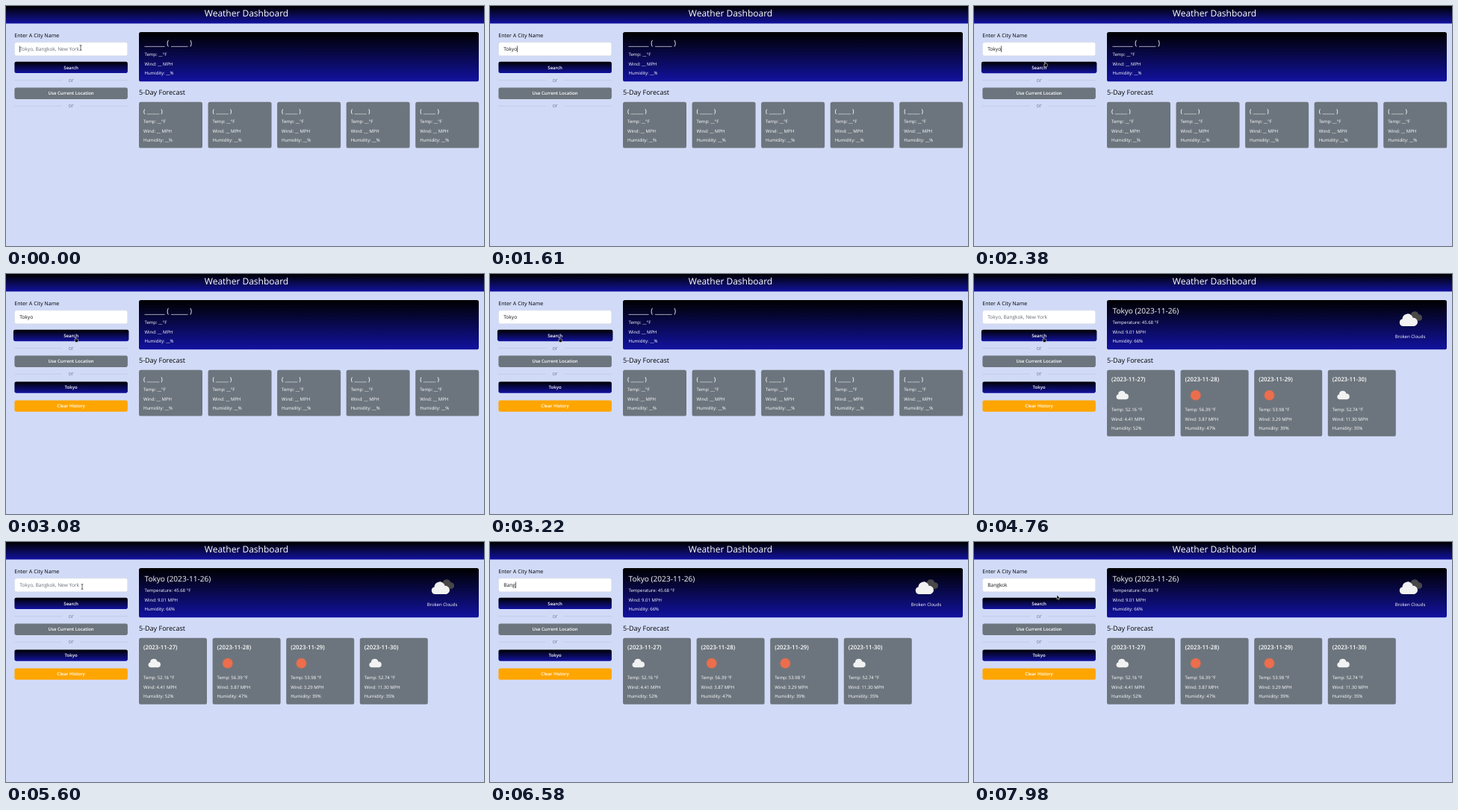
Write an HTML page that moves like this. It is 640 by 322 pixels and loops after 8 s.

```html
<!DOCTYPE html>
<html lang="en">
<head>
<meta charset="utf-8">
<title>Weather Dashboard</title>
<style>
  html, body { margin: 0; height: 100%; overflow: hidden; background: #d1dbf7; }
  svg { display: block; width: 100vw; height: 100vh; }
  text { font: 6px "Open Sans", "Noto Sans", sans-serif; fill: #fff; text-rendering: geometricPrecision; white-space: pre; }
  .mid { text-anchor: middle; }
  .title { font-size: 12px; font-weight: 500; }
  .city { font-size: 10.1px; font-weight: 500; }
  .day { font-size: 7.8px; font-weight: 600; }
  .btn { font-weight: 600; }
  .label { font-size: 7.1px; font-weight: 500; fill: #000; }
  .sub { font-size: 9px; font-weight: 500; fill: #000; }
  .or { font-size: 7.3px; fill: #77819a; }
  .field { font-size: 6.6px; fill: #111; }
  #hint { fill: #666c75; }
</style>
</head>
<body>
<svg viewBox="0 0 640 322">
  <defs>
    <linearGradient id="night" x2="0" y2="1">
      <stop stop-color="#000"/><stop offset="1" stop-color="#1212a0"/>
    </linearGradient>
    <path id="cloud" d="M5.5 17A5 5 0 0 1 5 7.2 7.1 7.1 0 0 1 19 5.8 5.7 5.7 0 0 1 21 17Z"/>
  </defs>
  <rect width="640" height="23.5" fill="url(#night)"/>
  <text class="title mid" x="322" y="14.2">Weather Dashboard</text>

  <text class="label" x="11.3" y="42.4">Enter A City Name</text>
  <rect x="11.6" y="48.8" width="151" height="18" rx="2.4" fill="#fff" stroke="#ced4da" stroke-width=".4"/>
  <text class="field" id="hint" x="18.2" y="60.2">Tokyo, Bangkok, New York</text>
  <text class="field" id="typed" x="18.2" y="60.2"></text>
  <rect id="caret" y="53.5" width=".6" height="8.5" fill="#000"/>
  <g id="side"></g>
  <g id="history"></g>

  <rect x="178" y="35" width="455" height="66.3" rx="2.6" fill="url(#night)"/>
  <text class="sub" x="178" y="118.8">5-Day Forecast</text>
  <g id="blank"></g>
  <g id="live"></g>

  <g id="pointer" stroke="#fff" stroke-width=".5" stroke-linejoin="round">
    <path id="beam" d="M-1.4 -3.5Q0 -3.5 0 -2.6Q0 -3.5 1.4 -3.5M0 -2.8V2.8M-1.4 3.5Q0 3.5 0 2.6Q0 3.5 1.4 3.5" fill="none" stroke="#222" stroke-width=".7"/>
    <path id="arrow" d="M0 -1V4.8L1.3 3.6 2.2 5.6 3.2 5.1 2.3 3.2H4Z"/>
    <path id="hand" d="M-1.3 -3.4Q-.6 -4 -.2 -3.2V-1L2.2 -.5Q2.9 -.2 2.7 1L2 3.4H-.9L-2.5 .8Q-2.3 -.1 -1.3 .6Z"/>
  </g>
</svg>
<script>
const $ = id => document.getElementById(id);
const text = (cls, x, y, s) => `<text class="${cls}" x="${x}" y="${y}">${s}</text>`;
const lines = (x, y, list) => list.map((s, i) => text('', x, y + i * 12.6, s)).join('');
const button = (y, fill, label, id = '') => `<g id="${id}">
  <rect x="11.4" y="${y}" width="151.5" height="15.3" rx="2.4" fill="${fill}"/>
  ${text('btn mid', 87.1, y + 9.8, label)}</g>`;
const divider = y => `<path d="M11.4 ${y}H75M99 ${y}H163" stroke="#b3bdd8" stroke-width=".5"/>
  ${text('or mid', 87.1, y + 2.2, 'or')}`;
const card = (x, w, h, day, icon, y, list) => `<rect x="${x}" y="128.8" width="${w}" height="${h}" rx="2.6" fill="#6c757d"/>
  ${text('day', x + 6, 144.1, day)}${icon}${lines(x + 6, y, list)}`;
const cloud = (x, y, scale, fill) =>
  `<use href="#cloud" fill="${fill}" transform="translate(${x} ${y}) scale(${scale})"/>`;
const sun = x => `<circle cx="${x}" cy="162.7" r="7.2" fill="#ec6e4c" opacity=".5"/>
  <circle cx="${x}" cy="162.7" r="6.4" fill="#ec6e4c"/>`;

$('side').innerHTML = button(74.8, 'url(#night)', 'Search', 'search') + divider(99.6) +
  button(109.6, '#6c757d', 'Use Current Location') + divider(134.2);
$('history').innerHTML = button(144.4, 'url(#night)', 'Tokyo') + button(169.5, '#ffa500', 'Clear History');

const empty = ['Temp: __°F', 'Wind: __ MPH', 'Humidity: __%'];
$('blank').innerHTML = text('city', 185.5, 53, '______ ( _____ )') + lines(185.5, 67, empty) +
  [0, 1, 2, 3, 4].map(i => card(178 + i * 92.55, 85, 61.8, '( _____ )', '', 157, empty)).join('');

const forecast = [
  ['52.16', '4.41', 52], ['56.39', '3.87', 47], ['53.98', '3.29', 39], ['52.74', '11.30', 35]
];
$('live').innerHTML = text('city', 185.5, 53, 'Tokyo (2023-11-26)') +
  lines(185.5, 67, ['Temperature: 45.68 °F', 'Wind: 9.01 MPH', 'Humidity: 66%']) +
  cloud(581, 50, .75, '#484848') + cloud(568.6, 53, 1, '#f2f2f2') +
  text('mid', 584, 86.2, 'Broken Clouds') +
  forecast.map(([temp, wind, wet], i) => {
    const x = 178 + i * 98.6;
    const icon = i % 3 ? sun(x + 20.2) : cloud(x + 11.7, 156.6, .68, '#f2f2f2');
    return card(x, 91, 89, `(2023-11-${27 + i})`, icon, 184.2,
      [`Temp: ${temp} °F`, `Wind: ${wind} MPH`, `Humidity: ${wet}%`]);
  }).join('');

// [time, field value, has focus]
const input = [
  [-150, '', 1], [560, 'T', 1], [700, 'To', 1], [840, 'Tok', 1], [1050, 'Toky', 1], [1260, 'Tokyo', 1],
  [2870, 'Tokyo', 0], [3290, '', 0], [5670, '', 1], [5880, 'B', 1], [6090, 'Ba', 1], [6160, 'Ban', 1],
  [6300, 'Bang', 1], [7140, 'Bangk', 1], [7280, 'Bangko', 1], [7350, 'Bangkok', 1]
];
// [start, end, from x, from y, to x, to y]
const moves = [
  [0, 1, 100, 56, 100, 56], [1900, 2660, 100, 56, 94, 88],
  [5000, 5530, 94, 88, 102, 60], [7420, 7980, 102, 60, 111, 72]
];
const latest = (list, t) => list.filter(e => e[0] <= t).pop();
const show = (id, on) => $(id).style.display = on ? '' : 'none';

function draw(t) {
  const [since, value, focus] = latest(input, t);
  $('typed').textContent = value;
  show('hint', !value);
  show('caret', focus && (t - since) % 1000 < 500);
  $('caret').setAttribute('x', 18.4 + (value ? $('typed').getComputedTextLength() : 0));

  show('history', t >= 2870);
  show('blank', t < 3290);
  show('live', t >= 3290);

  const [a, b, x0, y0, x1, y1] = latest(moves, t);
  const p = Math.min(1, (t - a) / (b - a)), e = p * p * (3 - 2 * p);
  const x = x0 + (x1 - x0) * e, y = y0 + (y1 - y0) * e;
  const typing = t >= 560 && t < 1900 || t >= 5880 && t < 7420;
  const inField = y < 67, hover = y > 74.8 && y < 90.2;
  $('pointer').setAttribute('transform', `translate(${x} ${y})`);
  show('pointer', !typing);
  show('beam', inField);
  show('hand', hover);
  show('arrow', !inField && !hover);
  $('search').setAttribute('transform', hover ? 'translate(87.1 82.4) scale(1.02) translate(-87.1 -82.4)' : '');
}

const start = performance.now();
(function tick() {
  draw((performance.now() - start) % 8000);
  requestAnimationFrame(tick);
})();
</script>
</body>
</html>
```
